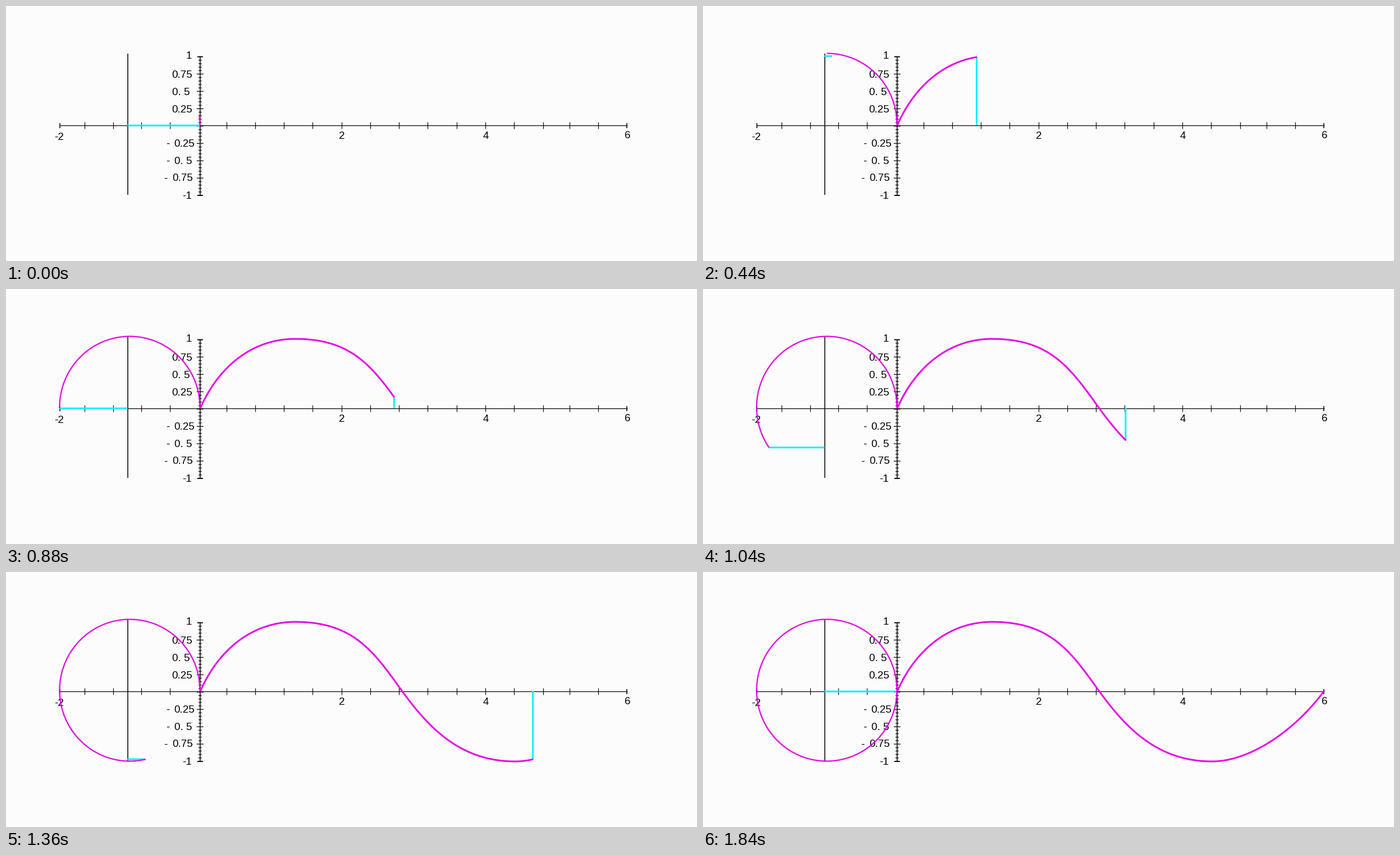
These frames come from a looping animation (1231 by 455 pixels, 1880 ms). A matplotlib script:

```python
import numpy as np
import matplotlib.pyplot as plt
from matplotlib.animation import FuncAnimation

W, H, DPI = 1231, 455, 128
PX = 72 / DPI  # points per pixel
AXIS_X, AXIS_Y = 345.8, 213
BASE_X = 217
BLACK, CYAN = "#0a0a0a", "#14f1fb"
STEPS = 47

fig = plt.figure(figsize=(W / DPI, H / DPI), dpi=DPI, facecolor="#fcfcfc")
ax = fig.add_axes([0, 0, 1, 1])
ax.set_xlim(0, W)
ax.set_ylim(H, 0)
ax.axis("off")


def line(xs, ys, width, color=BLACK, z=1, **kw):
    return ax.plot(xs, ys, color=color, lw=width * PX, zorder=z,
                   solid_capstyle="butt", **kw)[0]


def label(x, baseline, text):
    ax.text(x, baseline, text, family="Liberation Sans", fontsize=18.7 * PX,
            color="black", ha="left", va="baseline", zorder=2)


def bezier(p0, p1, p2, p3, n=120):
    t = np.linspace(0, 1, n)[:, None]
    p0, p1, p2, p3 = map(np.array, (p0, p1, p2, p3))
    return ((1 - t) ** 3 * p0 + 3 * (1 - t) ** 2 * t * p1
            + 3 * (1 - t) * t ** 2 * p2 + t ** 3 * p3)


def ellipse(deg, cy, ry):
    a = np.radians(deg)
    return 220.5 + 125 * np.cos(a), cy - ry * np.sin(a)


def draw_axes():
    line([95.5, 1106.5], [AXIS_Y, AXIS_Y], 1.3)
    for x in np.r_[np.linspace(140, 292, 4), np.linspace(392.5, 956.5, 12),
                   1004, 1055]:
        line([x, x], [206.5, 218.5], 1.2)
    for x in (95.5, 1106):
        line([x, x], [209, 217.5], 1.6)

    line([AXIS_X, AXIS_X], [90, 338], 1.6, snap=False)
    for k, y in enumerate(np.linspace(90.5, 338, 41)):
        if k % 40 == 0:
            half, width = 5, 2
        elif k % 5 == 0:
            half, width = 6, 1.3
        else:
            half, width = 3, 1.2
        line([AXIS_X - half, AXIS_X + half], [y, y], width, snap=False)

    line([BASE_X, BASE_X], [85, 337], 1.6)


def draw_labels():
    lefts = (299.5, 299.5, 296)
    for k, (text, x) in enumerate(zip(("0.25", "0. 5", "0.75"), lefts), 1):
        label(295.5, 220.7 - 31 * k, text)
        low = 220.3 + 30.7 * k
        label(x - 14.5, low, "-")
        label(x, low, text)
    label(321, 94, "1")
    label(314, 344, "-1")
    label(86.5, 239, "-2")
    label(593.5, 237, "2")
    label(849.5, 237, "4")
    label(1102, 236, "6")


draw_axes()
draw_labels()

# wave path with its arc length, split at the middle crossing
rise = np.vstack([
    bezier((346, 213), (380, 135), (442, 89), (515, 89)),
    bezier((515, 89), (618, 89), (654, 140), (706, 213)),
])
dip = np.vstack([
    bezier((706, 213), (752, 276), (808, 338), (907, 338)),
    bezier((907, 338), (975, 338), (1055, 282), (1106, 213)),
])
wave = np.vstack([rise, dip])
arc = np.r_[0, np.cumsum(np.hypot(*np.diff(wave, axis=0).T))]
middle = arc[len(rise)]

height_bar = line([], [], 3, CYAN, 3, snap=False)
radius_bar = line([], [], 3, CYAN, 3, snap=False)
circle = line([], [], 2.4, "#e000e0", 4, alpha=0.93)
curve = line([], [], 3, "#e800e8", 5)


def draw(i):
    step = max(i - 1, 0)

    turn = np.interp(step, (0, 21, 42), (7.7, 180.5, 360))
    circle.set_data(*ellipse(np.linspace(-1, turn, 240), 211, 126.5))

    # the radius bar slows down over its last few steps
    bar_turn = np.interp(step, (0, 37, 42, 45), (0, 317, 351, 360))
    x, y = ellipse(bar_turn, 213.1, 124)
    radius_bar.set_data([BASE_X - 0.5, x], [y, y])

    done = np.interp(step, (1.15, 22.1, 41.2), (0, middle, arc[-1]))
    x, y = (np.interp(done, arc, wave[:, k]) for k in (0, 1))
    drawn = wave[arc < done]
    curve.set_data(np.r_[drawn[:, 0], x], np.r_[drawn[:, 1], y])
    height_bar.set_data([x - 0.5, x - 0.5], [AXIS_Y, y])
    return height_bar, radius_bar, circle, curve


anim = FuncAnimation(fig, draw, frames=STEPS, interval=40, repeat=True,
                     repeat_delay=0, blit=False)
plt.show()
```
